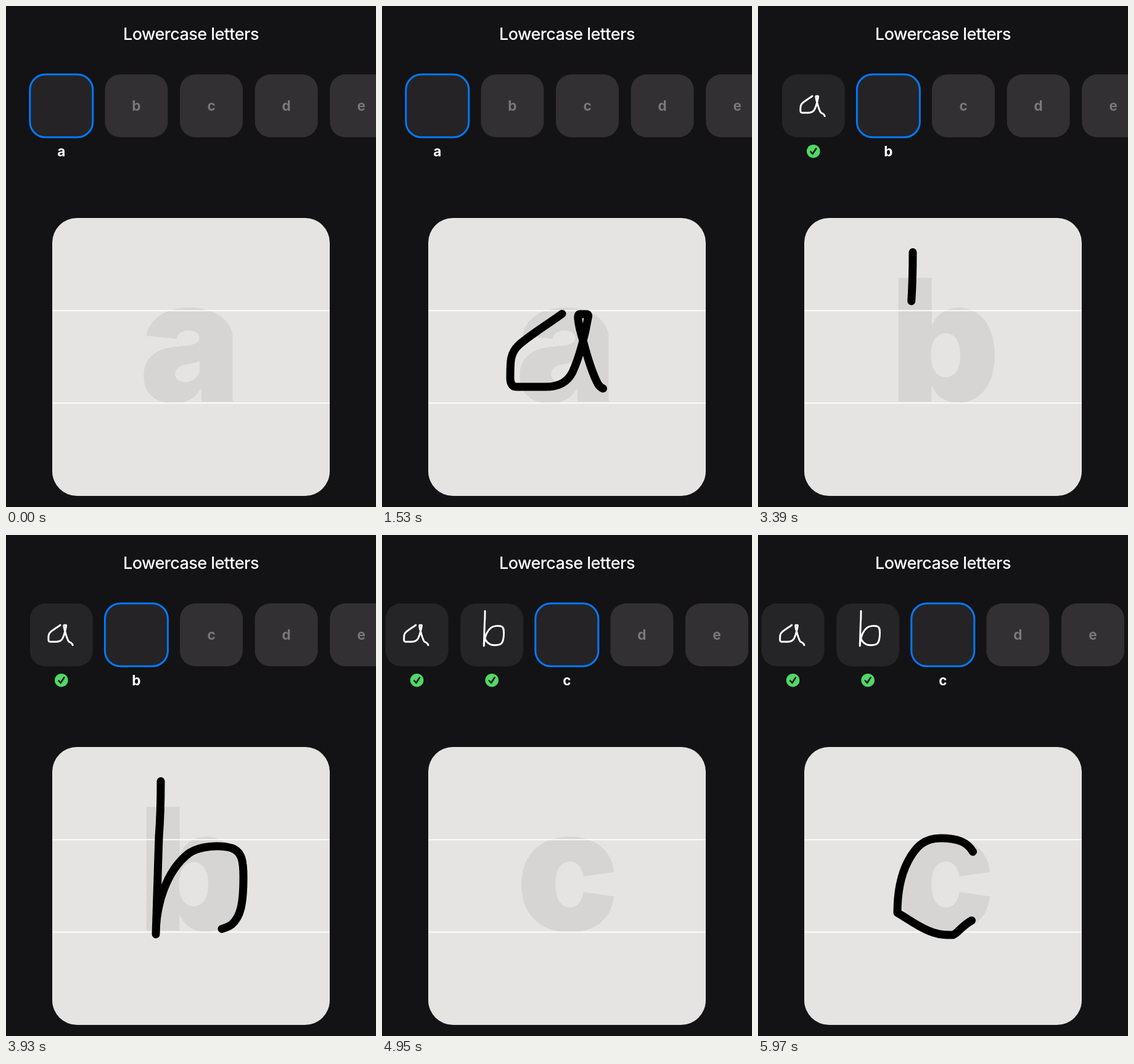
An HTML page for the animation above (6.03 s loop, 600 by 813 pixels).

```html
<!DOCTYPE html>
<html lang="en">
<head>
<meta charset="utf-8">
<title>Lowercase letters</title>
<style>
  html, body { margin: 0; width: 100%; height: 100%; overflow: hidden; background: #131214; }
  svg { display: block; width: 100vw; height: 100vh; font-family: Inter, sans-serif; text-anchor: middle; }
  .title { font-size: 27px; font-weight: 500; letter-spacing: -.02em; fill: #fff; }
  .label { font-size: 22.5px; font-weight: 700; }
  .guide { font-size: 276px; font-weight: 900; fill: #d6d5d3; }
  .ink { fill: none; stroke: #000; stroke-width: 13; stroke-linecap: round; stroke-linejoin: round; }
  .thumb { stroke: #fff; }
  .card { fill: #323032; }
  .active .card { fill: #252325; stroke: #007aff; stroke-width: 3; }
  .done .card { fill: #252426; }
  .hint { fill: #7a787a; }
  .name { fill: #fff; }
  .active .hint, .done .hint, .slot:not(.active) .name,
  .slot:not(.done) .thumb, .slot:not(.done) .check { display: none; }
</style>
</head>
<body>
<svg viewBox="0 0 600 813" preserveAspectRatio="none">
  <text class="title" x="300" y="55">Lowercase letters</text>
  <g id="row"></g>
  <rect x="75" y="344" width="450" height="451" rx="40" fill="#e5e4e2"/>
  <text class="guide" id="guide" y="642"></text>
  <path d="M75 494.3H525M75 644.3H525" stroke="#fff" stroke-width="1.8"/>
  <path class="ink" id="ink"/>
</svg>
<script>
const LOOP = 6030, STEP = 60, PITCH = 121.6, SCROLL = 33.2;

// Each letter: when it becomes active, its pen path, and [time, share of path drawn].
const letters = [
  { name: 'a', from: 0, x: 299,
    path: 'M292 499.500C262 521 236 537 222 550C208 563 208 576 208 600Q207 618 218 618H265C290 618 302 608 309 594C321 568 330 530 334 506Q336 500 331 500H321Q317 500 318 508C319 520 322 530 326 543C333 570 341 596 350 613Q354 620 362 622C372 625 377 632 381 642',
    pace: [[660, 0], [990, .37], [1290, .69], [1590, 1]] },
  { name: 'b', from: 2790, x: 303,
    path: 'M251 399.500Q251 450 248 490L243 648C243 600 260 545 296 517C312 505 346 502 366 508C383 514 385 530 385 555C385 600 380 620 366 632C350 644 310 646 290 638C272 630 258 614 250 596',
    pace: [[3270, 0], [3390, .107], [4050, 1]] },
  { name: 'c', from: 4590, x: 301,
    path: 'M348.500 514C340 499 325 492 296 492C270 492 256 505 243 530C230 555 226 585 226 613C242 622 262 638 284 645C296 649 305 649 316 649C325 646 328 636 346.500 625.500',
    pace: [[5160, 0], [5250, .13], [5910, 1]] },
  { name: 'd' }, { name: 'e' }
];

const row = document.getElementById('row');
const guide = document.getElementById('guide');
const ink = document.getElementById('ink');

row.innerHTML = letters.map(({ name, path = '' }, i) => `
  <g class="slot" transform="translate(${89.8 + i * PITCH} 162)">
    <rect class="card" x="-51" y="-51" width="102" height="102" rx="25"/>
    <text class="label hint" y="8">${name}</text>
    <path class="ink thumb" d="${path}" transform="scale(.2277) translate(-300 -569)"/>
    <text class="label name" y="82">${name}</text>
    <g class="check">
      <circle cy="73.700" r="10.800" fill="#4fd966"/>
      <path d="M-4.300 74.500L-1.200 78L4.500 69.300" fill="none" stroke="#131214" stroke-width="2.600" stroke-linecap="round" stroke-linejoin="round"/>
    </g>
  </g>`).join('');
const slots = [...row.children];

const clamp = v => Math.min(1, Math.max(0, v));
const smooth = v => v * v * (3 - 2 * v);

function follow(pace, t) {
  const i = pace.findIndex(([time]) => time > t);
  if (i < 0) return 1;
  if (i === 0) return 0;
  const [t0, v0] = pace[i - 1], [t1, v1] = pace[i];
  return v0 + (v1 - v0) * (t - t0) / (t1 - t0);
}

let shown = -1;
function draw(t) {
  const current = letters.filter(l => l.from <= t).length - 1;
  const { name, path, pace, x } = letters[current];
  if (current !== shown) {
    shown = current;
    slots.forEach((slot, i) => {
      slot.classList.toggle('done', i < current);
      slot.classList.toggle('active', i === current);
    });
    guide.textContent = name;
    guide.setAttribute('x', x);
    ink.setAttribute('d', path);
  }
  const length = ink.getTotalLength();
  ink.style.display = t > pace[0][0] ? '' : 'none';
  ink.style.strokeDasharray = `${length * follow(pace, t)} ${length * 2}`;
  row.setAttribute('transform', `translate(${-SCROLL * smooth(clamp((t - 4600) / 320))} 0)`);
}

function tick() {
  const t = performance.now() % LOOP;
  draw(t < STEP ? 0 : Math.floor((t - 30) / STEP) * STEP + 30);
  requestAnimationFrame(tick);
}
tick();
</script>
</body>
</html>
```
